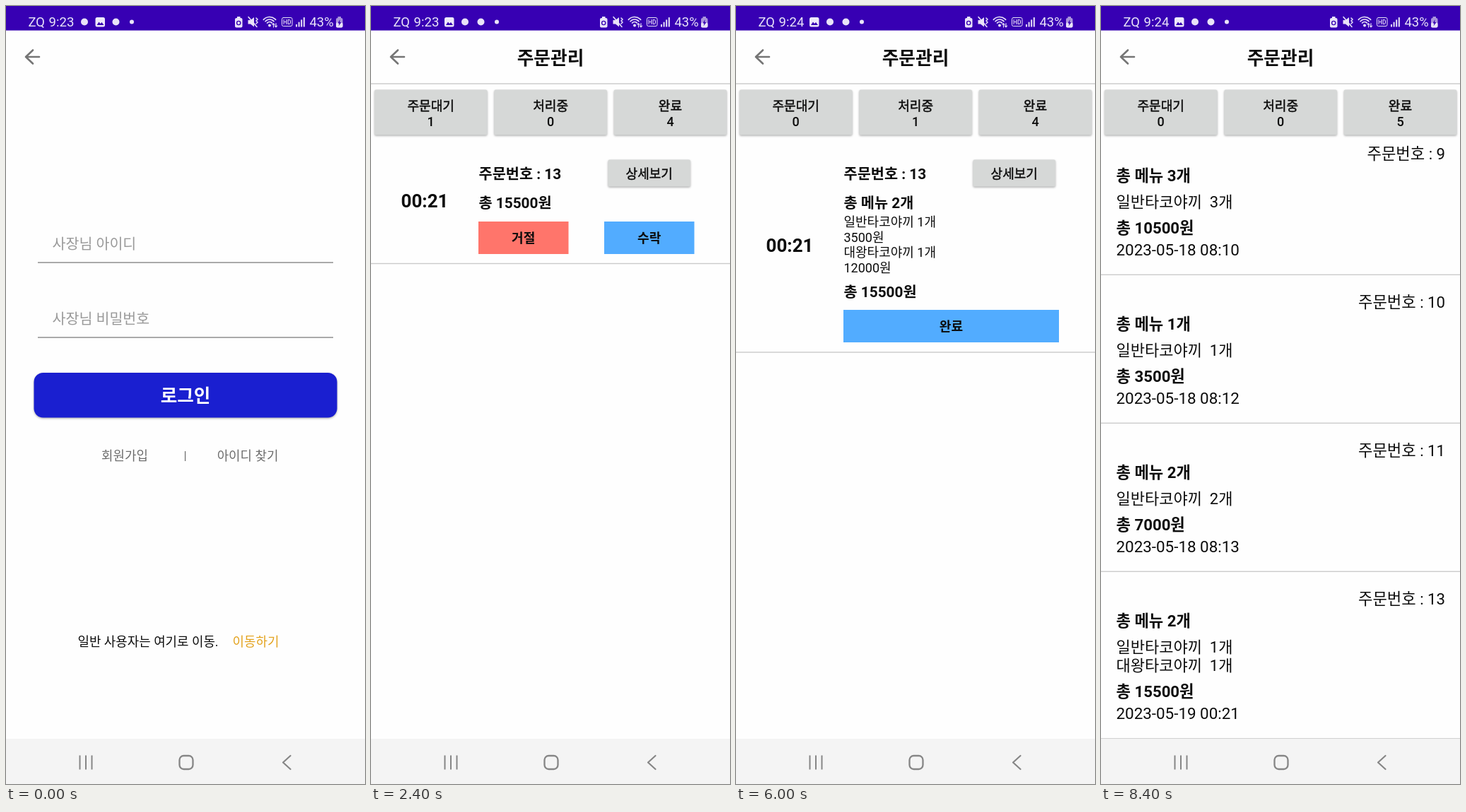
Recreate the animation shown at these times as an HTML page with a canvas. Size 508x1101 px, loop 9600 ms.

```html
<!DOCTYPE html>
<html lang="ko">
<head>
<meta charset="utf-8">
<title>주문관리</title>
<style>
html, body { margin: 0; width: 100%; height: 100%; overflow: hidden; background: #fefefe; }
canvas { display: block; width: 508px; height: 1101px; }
</style>
</head>
<body>
<canvas id="stage"></canvas>
<script>
const W = 508, H = 1101, STEP = 1200;
const canvas = document.getElementById('stage');
const dpr = window.devicePixelRatio || 1;
canvas.width = W * dpr;
canvas.height = H * dpr;
const c = canvas.getContext('2d');
const FONT = 'Roboto, "Noto Sans CJK KR", "Noto Sans CJK", "Noto Sans KR", sans-serif';
const BLACK = '#0c0c0c', BLUE = '#52acff', RED = '#ff756b';

// Text is placed by the vertical middle of its glyphs
function text(s, x, y, size, color = BLACK, weight = 400, align = 'left') {
  c.font = `${weight} ${size}px ${FONT}`;
  c.textAlign = align;
  c.fillStyle = c.strokeStyle = color;
  c.fillText(s, x, y + size * 0.365);
  // Hangul may lack a medium weight, so thicken it a little
  if (weight === 500 && /[가-힣]/.test(s)) {
    c.lineWidth = 0.45;
    c.strokeText(s, x, y + size * 0.365);
  }
}
const mid = (s, x, y, size, color, weight) => text(s, x, y, size, color, weight, 'center');

function rect(x, y, w, h, fill) {
  c.fillStyle = fill;
  c.fillRect(x, y, w, h);
}

function box(x, y, w, h, r, fill, stroke, lw = 2) {
  c.beginPath();
  c.roundRect(x, y, w, h, r);
  paint(fill, stroke, lw);
}

function paint(fill, stroke, lw) {
  if (fill) { c.fillStyle = fill; c.fill(); }
  if (stroke) { c.strokeStyle = stroke; c.lineWidth = lw; c.stroke(); }
}

function path(d, fill, stroke, lw = 2) {
  const p = new Path2D(d);
  if (fill) { c.fillStyle = fill; c.fill(p); }
  if (stroke) { c.strokeStyle = stroke; c.lineWidth = lw; c.stroke(p); }
}

function circle(x, y, r, fill, stroke, lw) {
  c.beginPath();
  c.arc(x, y, r, 0, Math.PI * 2);
  paint(fill, stroke, lw);
}

function raised(x, y, w, h, r, fill, blur = 3, drop = 1.2) {
  c.save();
  c.shadowColor = 'rgba(0,0,0,.32)';
  c.shadowBlur = blur * dpr;
  c.shadowOffsetY = drop * dpr;
  box(x, y, w, h, r, fill);
  c.restore();
}

const rule = y => rect(0, y - 0.7, W, 1.4, '#cbcbcb');
const backArrow = () => path('M38 62.5L28 72L38 81.5M28 72H47', null, '#757575', 2.6);

function photoIcon(x) {
  box(x, 16, 13.5, 13.5, 2.5, '#eee9fa');
  path(`M${x + 2} 27L${x + 5} 22.5L${x + 7} 25L${x + 9} 23L${x + 12} 27Z`, '#3700b3');
}

function statusBar(time, first) {
  const ink = '#e9e3f8', bg = '#3700b3';
  rect(0, 0, W, 34.6, bg);
  text('ZQ', 31.5, 22.5, 18.4, ink);
  text(time, 60.5, 22.5, 18.6, ink);
  photoIcon(first ? 126.5 : 104);
  circle(first ? 111 : 133, 22.5, 5, ink);
  circle(155.5, 22.5, 5, ink);
  circle(178, 22.5, 3, ink);

  box(324, 17, 10.5, 13.5, 2, ink);
  rect(327, 15, 4.5, 3, ink);
  circle(329.2, 24, 2.6, null, bg, 1.4);
  path('M342.5 20H346L351 16V29.5L346 25.5H342.5Z', ink);
  path('M343 15.5L355 29.5M354 17L356 19L354 21L356 23L354 25', null, ink, 1.6);
  [11.5, 8, 4.5].forEach(r => {
    c.beginPath();
    c.arc(373, 27, r, -Math.PI * 0.77, -Math.PI * 0.23);
    paint(null, ink, 1.7);
  });
  circle(373, 27.5, 2, ink);
  path('M378.5 30V25M376.8 26.5L378.5 24.5L380.2 26.5M382 24.5V29.5M380.3 28L382 30L383.7 28', null, ink, 1.1);
  box(390.5, 16.5, 14.5, 12, 2, null, ink, 1);
  mid('HD', 397.8, 22.5, 8.4, ink, 500);
  for (let i = 0; i < 4; i++) rect(410 + i * 3.6, 26 - i * 3.3, 2, 3.5 + i * 3.3, ink);
  text('43%', 429.5, 22.5, 18.4, ink);
  box(467, 17, 9.5, 13.5, 2, '#aa94dc');
  rect(469.5, 15, 4.5, 2.5, '#aa94dc');
  box(467, 23.5, 9.5, 7, 2, ink);
  path('M472.5 19L469.5 24.5H471.5L470.5 28.5L474.5 23H472.3Z', bg);
}

function navBar() {
  const ink = '#868686';
  rect(0, 1037, W, 64, '#f4f4f4');
  [104.5, 113, 121.5].forEach(x => rect(x - 1, 1060.5, 2, 20, ink));
  box(245.5, 1061, 19, 19, 6, null, ink, 2.3);
  path('M402.5 1061L392 1070.5L402.5 1080', null, ink, 2.2);
}

function login() {
  backArrow();
  [['사장님 아이디', 336], ['사장님 비밀번호', 442]].forEach(([s, y]) => {
    text(s, 65.5, y, 20.6, '#9a9a9a');
    rect(45, y + 26.3, 418, 1.5, '#8f8f8f');
  });
  raised(39.5, 519, 429, 63.5, 13, '#1a1fd0');
  mid('로그인', 254, 552, 25.6, '#fff', 700);
  mid('회원가입', 168, 636, 17.9, '#6c6c6c');
  mid('|', 253.5, 636, 17, '#6c6c6c');
  mid('아이디 찾기', 342, 636, 17.9, '#6c6c6c');
  text('일반 사용자는 여기로 이동.', 101.5, 899, 17.9);
  text('이동하기', 320.5, 899, 17.9, '#e3a21c');
}

function shopPicture() {
  const line = (d, lw = 5.6) => path(d, null, '#000', lw);
  box(0.8, 35.5, 506.4, 276.5, [5, 5, 28, 28], '#fff', '#cdcdcd', 1.5);
  rect(115, 35, 278, 278, '#f0f0f0');
  box(217.5, 82, 128, 44, 10, null, '#000', 5.6);
  line('M228.5 116V95H242M228.5 106H240', 5);
  [253, 283].forEach(x => box(x, 95, 21, 21, 10, null, '#000', 5));
  line('M316.5 95H324Q334.5 95 334.5 105.5Q334.5 116 324 116H316.5Z', 5);
  line('M181 243H163V191Q163 180 174 180H181Q187 180 190 174L208 136Q212 128 220 128H337Q345.5 128 345.5 138V243H327M224 243H283');
  line('M225 141H240Q247 141 247 148V176Q247 183 240 183H212Q205 183 208 176L219 147Q221 141 225 141Z');
  box(260, 140, 73, 66, 1, null, '#000', 5.6);
  let awning = 'M260 149';
  for (let i = 0; i < 4; i++) awning += 'c0 12 18.2 12 18.2 0';
  line(awning, 5);
  line('M260 194H333M273 194V171H302V194', 5.5);
  line('M278 184H284', 4);
  [202, 305].forEach(x => {
    circle(x, 243.5, 21.5, null, '#000', 5.8);
    circle(x, 243.5, 9.5, null, '#000', 5.4);
  });
}

function truckIcon() {
  const body = 'M74.5 507H170Q178 507 181 516L188 547Q195.5 551 195.5 559V582H74.5Z';
  path(body, '#f8ac4c');
  path('M148 519H180L188 547Q195.5 551 195.5 559V582H148Z', '#ea7840');
  path(body, null, '#111', 4);
  path('M148 582V519H180', null, '#111', 3);
  box(86, 520, 53, 36, 1, '#59616e', '#111', 3.4);
  rect(88, 548, 49, 6.5, '#868d99');
  for (let i = 0; i < 6; i++) {
    path(`M${85.5 + i * 9} 520h9v6a4.5 5 0 0 1 -9 0z`, i % 2 ? '#fff1df' : '#ed7643', '#111', 2.2);
  }
  path('M154 526H172L177 548H154Z', '#d7dfec', '#111', 3);
  path('M153 558H160M187 564H195', null, '#111', 3);
  [99, 173].forEach(x => {
    circle(x, 582, 13, '#454a52', '#111', 4);
    circle(x, 582, 5.5, '#b8bdc4', '#111', 2.6);
  });
}

function menuIcon() {
  box(331.5, 500, 90, 102.5, 2, '#e88b32', '#111', 3.4);
  for (let i = 0; i < 6; i++) box(324, 507 + i * 16.2, 12, 5.5, 3, '#d8d8d8', '#111', 2.4);
  circle(376, 517, 3.2, '#d8dce0', '#111', 2.6);
  path('M349 545A27 25 0 0 1 403 545Z', '#d9dde1', '#111', 3);
  path('M358 540Q361 528 371 525', null, '#fff', 3);
  box(346, 544.5, 60, 4.5, 2, '#f3f3f3', '#111', 2.2);
  path('M346 563H406M346 588H353M361 588H393M400 588H406', null, '#111', 2.8);
  c.letterSpacing = '2.5px';
  mid('MENU', 377.5, 575.5, 18, '#2b1a0a', 700);
  c.letterSpacing = '0px';
}

function chartIcon() {
  box(83, 802, 103, 70, 3, '#9a9f98');
  box(88.5, 808, 92, 60, 1, '#cce9f8', '#111', 3.4);
  path('M83 803H142M163 803H186', null, '#111', 3.4);
  path('M102 814V857H174M98 824H102M98 834H102M98 844H102', null, '#111', 2.8);
  [[111, 836, '#f6d66b'], [123, 827, '#eda36f'], [135, 820, '#f6d66b'], [147, 792, '#e57373']].forEach(
    ([x, y, fill]) => box(x, y, 11.5, 857 - y, 0, fill, '#111', 2.8));
  rect(82, 873, 105, 10, '#a2a69d');
  path('M83 874H186M83 882.5H186', null, '#111', 3);
}

function orderIcon() {
  path('M340 866V794.5H422V872Q422 885.5 408 885.5H352Z', '#fff', '#111', 4);
  path('M324 866H389Q390 885.5 407 885.5H343Q324 885.5 324 866Z', '#fbac17', '#111', 4);
  [811, 825, 838.5].forEach(y => {
    circle(357, y, 2.3, '#fbac17');
    path(`M368 ${y}H404`, null, '#fbac17', 3.2);
  });
}

function home() {
  shopPicture();
  mid('도란구름분식', 254, 367, 36, BLACK, 700);
  mid('nibo4', 254, 416, 18.3, '#6e6e6e');
  [['가게관리', 35, 472, truckIcon], ['메뉴관리', 273, 472, menuIcon],
   ['통계관리', 35, 761, chartIcon], ['주문관리', 273, 761, orderIcon]].forEach(([s, x, y, icon]) => {
    raised(x, y, 200, 199, 40, '#ededed', 4, 1.5);
    icon();
    mid(s, x + 100, y + 166, 23, BLACK, 700);
  });
}

function header(...counts) {
  backArrow();
  mid('주문관리', 254, 73.5, 25.7, BLACK, 700);
  rule(110);
  ['주문대기', '처리중', '완료'].forEach((s, i) => {
    const x = 5 + i * 169.4;
    raised(x, 118.5, 159.5, 64, 2, '#d6d8d7');
    mid(s, x + 79.7, 141, 18.1, BLACK, 500);
    mid(counts[i], x + 79.7, 163, 18, BLACK, 500);
  });
}

function button(s, x, y, w, fill) {
  rect(x, y, w, 46, fill);
  mid(s, x + w / 2, y + 23.5, 18.1, BLACK, 700);
}

function order(open, accepted) {
  const x = 152.5, bold = (s, y) => text(s, x, y, 20.8, BLACK, 700);
  const dy = open ? 125.5 : 0;
  bold('주문번호 : 13', 237.5);
  raised(335.5, 217.5, 116.5, 38, 2, '#d6d8d7');
  mid('상세보기', 393.7, 237.5, 18, BLACK, 500);
  mid('00:21', 76, 275.5 + dy / 2, 26, BLACK, 700);
  if (open) {
    bold('총 메뉴 2개', 278.5);
    ['일반타코야끼 1개', '3500원', '대왕타코야끼 1개', '12000원'].forEach(
      (s, i) => text(s, x, 305.5 + i * 21.7, 18));
  }
  bold('총 15500원', 278.5 + dy);
  if (accepted) {
    button('완료', 152, 430, 305, BLUE);
  } else {
    button('거절', 152, 305 + dy, 127.5, RED);
    button('수락', 330, 305 + dy, 127.5, BLUE);
  }
  rule(364.5 + dy);
}

function toast(s) {
  box(107, 895, 294.5, 58, 29, '#4b4b4b');
  circle(149, 923.5, 14, '#f2e3c2');
  text(s, 175.5, 924, 20.6, '#fff');
}

function history() {
  const day = '2023-05-1';
  const list = [
    [9, 3, ['일반타코야끼  3개'], 10500, '8 08:10'],
    [10, 1, ['일반타코야끼  1개'], 3500, '8 08:12'],
    [11, 2, ['일반타코야끼  2개'], 7000, '8 08:13'],
    [13, 2, ['일반타코야끼  1개', '대왕타코야끼  1개'], 15500, '9 00:21']
  ];
  list.forEach(([no, count, items, sum, when], i) => {
    const y = 208.5 + i * 210, x = 21.5, size = 22.2;
    const end = y + (items.length - 1) * 26.5;
    text('주문번호 : ' + no, 487, y, size, BLACK, 400, 'right');
    text(`총 메뉴 ${count}개`, x, y + 31, size, BLACK, 700);
    items.forEach((s, k) => text(s, x, y + 68 + k * 26.5, 22));
    text(`총 ${sum}원`, x, end + 105, size, BLACK, 700);
    text(day + when, x, end + 136, 22.4);
    rule(end + 171.8);
  });
}

const scenes = [
  login,
  home,
  () => { header(1, 0, 4); order(false, false); },
  () => { header(1, 0, 4); order(true, false); },
  () => { header(0, 1, 4); toast('주문이 접수되었습니다.'); },
  () => { header(0, 1, 4); order(true, true); },
  () => { header(0, 0, 5); toast('주문이 완료되었습니다.'); },
  () => { header(0, 0, 5); history(); }
];

function draw(i) {
  c.setTransform(dpr, 0, 0, dpr, 0, 0);
  c.lineCap = c.lineJoin = 'round';
  rect(0, 0, W, H, '#fefefe');
  scenes[i]();
  statusBar(i < 3 ? '9:23' : '9:24', i === 0);
  navBar();
}

const start = performance.now();
let shown = -1;
function tick() {
  const i = Math.floor((performance.now() - start) / STEP) % scenes.length;
  if (i !== shown) draw(shown = i);
  requestAnimationFrame(tick);
}
tick();
</script>
</body>
</html>
```
